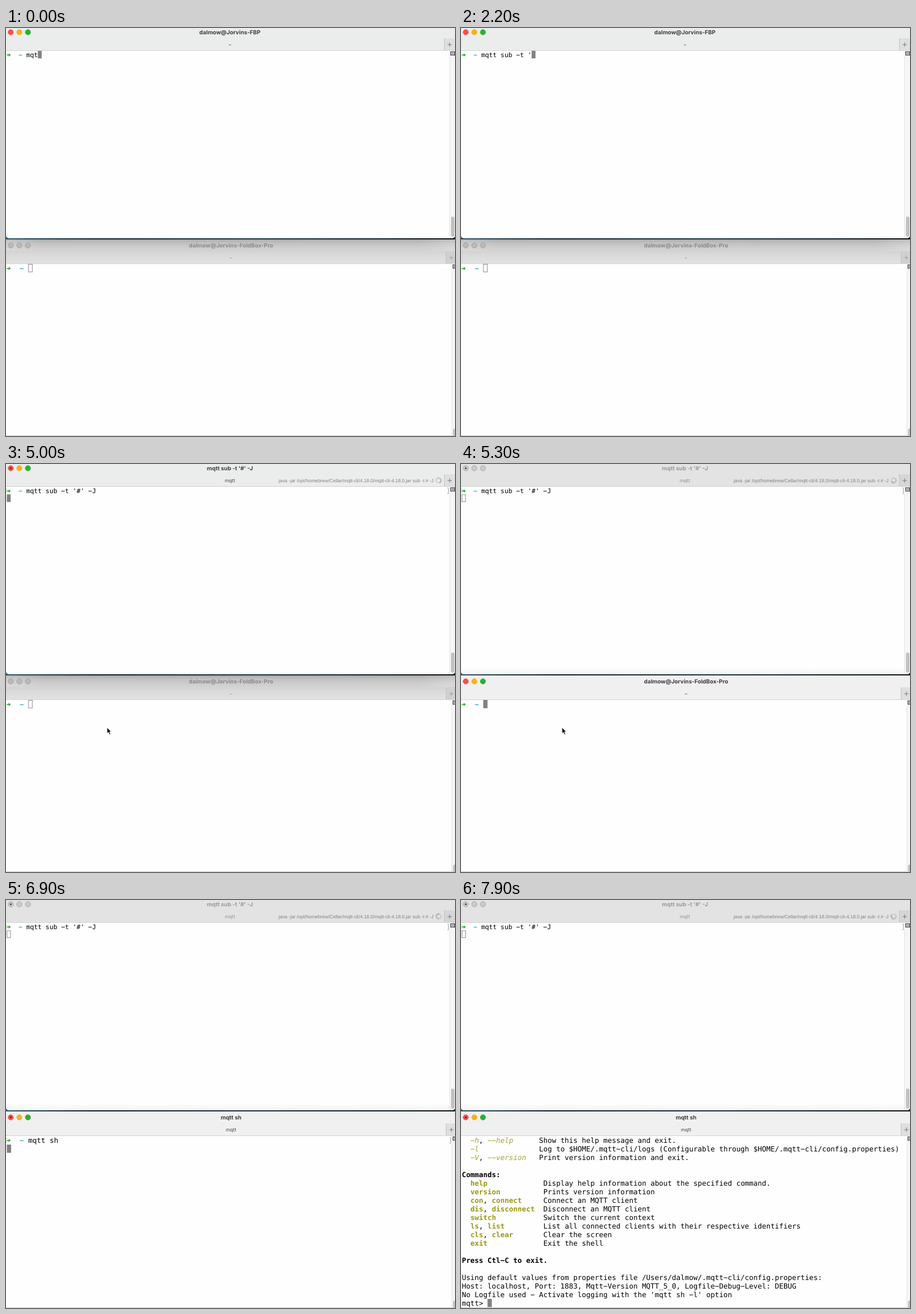
Write an HTML page that moves like this. It is 784 px wide and 714 px high and loops after 8 s.

```html
<!DOCTYPE html>
<html lang="en">
<head>
<meta charset="utf-8">
<title>Two terminals</title>
<style>
  html, body { margin: 0; width: 100%; height: 100%; overflow: hidden; background: #fff; }
  svg { display: block; width: 784px; height: 714px; }
  text { white-space: pre; text-rendering: geometricPrecision; }
  .mono { font-family: "DejaVu Sans Mono", monospace; }
  .ui { font-family: Inter, sans-serif; text-anchor: middle; }
  .job { font: 8.3px "Liberation Sans", sans-serif; fill: #808080; }
</style>
</head>
<body>
<svg id="stage" viewBox="0 0 784 714" xmlns="http://www.w3.org/2000/svg"></svg>
<script>
const LOOP = 8000, STEP = 100;
const FOCUS = 5300, RUN_TOP = 3800, JOB = 4000, RUN_BOTTOM = 6700, OUTPUT = 7300;
const USER = 'dalmow';

// Geometry of the two windows; size is the font size, row the line pitch.
const upper = { y: 0, mid: 391, edge: 774, tab: 765, size: 11.25, row: 13.2, base: 51, cell: 40, cellH: 13.2,
  bar: '#ebecec', host: USER + '@Jorvins-FBP' };
const lower = { y: 373, mid: 393, edge: 778, tab: 768, size: 12.44, row: 15, base: 424.6, cell: 413, cellH: 14.4,
  bar: '#f0f0f0', host: USER + '@Jorvins-FoldBox-Pro' };

// Each key appears at its own time.
const upperKeys = { text: "mqtt sub -t '#' -J",
  times: [0, 0, 0, 100, 300, 700, 900, 1000, 1200, 1600, 1800, 2000, 2200, 2500, 2700, 2800, 3200, 3300] };
const lowerKeys = { text: 'mqtt sh', times: [5900, 6000, 6100, 6200, 6300, 6400, 6500] };

const options = [
  ['-h, --help', 'Show this help message and exit.'],
  ['-l', 'Log to $HOME/.mqtt-cli/logs (Configurable through $HOME/.mqtt-cli/config.properties)'],
  ['-V, --version', 'Print version information and exit.']
];
const commands = [
  ['help', 'Display help information about the specified command.'],
  ['version', 'Prints version information'],
  ['con, connect', 'Connect an MQTT client'],
  ['dis, disconnect', 'Disconnect an MQTT client'],
  ['switch', 'Switch the current context'],
  ['ls, list', 'List all connected clients with their respective identifiers'],
  ['cls, clear', 'Clear the screen'],
  ['exit', 'Exit the shell']
];
const footer = [
  `Using default values from properties file /Users/${USER}/.mqtt-cli/config.properties:`,
  'Host: localhost, Port: 1883, Mqtt-Version MQTT_5_0, Logfile-Debug-Level: DEBUG',
  "No Logfile used - Activate logging with the 'mqtt sh -l' option",
  'mqtt>'
];

const BOLD = 'font-weight="700"';
const rect = (x, y, w, h, fill, more = '') =>
  `<rect x="${x}" y="${y}" width="${w}" height="${h}" fill="${fill}" ${more}/>`;
const path = (d, stroke, width = 1, fill = 'none') =>
  `<path d="${d}" stroke="${stroke}" stroke-width="${width}" fill="${fill}"/>`;
const colX = (win, col) => 1.4 + col * win.size * 0.602;
const typed = (keys, t) => keys.text.slice(0, keys.times.filter(k => k <= t).length);

// Terminal hyphens are drawn as wide as a minus sign.
function mono(win, col, row, str, more = '') {
  return `<text class="mono" x="${colX(win, col)}" y="${win.base + row * win.row}" font-size="${win.size}" ${more}>` +
    str.replace(/-/g, '\u2212') + '</text>';
}

function caret(win, col, row, active) {
  const x = colX(win, col), y = win.cell + row * win.row, w = win.size * 0.602;
  return active ? rect(x, y, w, win.cellH, '#828282')
    : rect(x + .3, y + .5, w - .6, win.cellH - 1, 'none', 'stroke="#8a8a8a"');
}

function prompt(win, command) {
  const y = win.base - 3.8;
  return path(`M1.5 ${y}H5`, '#22ad22', 1.7) +
    path(`M4.4 ${y - 3}L8.4 ${y}L4.4 ${y + 3}L5.2 ${y}Z`, 'none', 0, '#22ad22') +
    mono(win, 3, 0, '~', BOLD + ' fill="#35a9b9"') + mono(win, 5, 0, command);
}

function lights(win, active, running) {
  const dim = win === lower ? '#b9b9b9' : '#cbcbcb';
  return ['#f0524b', '#f5b11f', '#2bb034'].map((color, i) =>
    `<circle cx="${8.3 + i * 15}" cy="${win.y + 7.4}" r="4.6" fill="${active ? color : dim}"
      stroke="${active ? color : '#a0a0a0'}" stroke-width=".9"/>`).join('') +
    (running ? `<circle cx="8.3" cy="${win.y + 7.4}" r="1.6" fill="${active ? '#7c1712' : '#4a4a4a'}"/>` : '');
}

function chrome(win, active, title, tabTitle, running) {
  const { y, mid, tab } = win;
  const shaded = win === lower && !active;
  const bar = active ? win.bar : shaded ? 'url(#shade)' : '#e3e3e3';
  const top = win === lower ? 370 : 0;
  const plus = tab + 9.7, py = y + 29;
  return rect(0, top, 784, y + 39 - top, bar) +
    (shaded ? rect(0, top, 784, 20, 'url(#sides)') : '') +
    rect(tab, y + 18, 20, 21, shaded ? '#d0d0d0' : active ? '#dfdfe0' : '#d6d6d6') +
    path(`M${tab + .5} ${y + 18}V${y + 39}`, '#c2c2c2') +
    path(`M0 ${y + 39.5}H784`, '#d4d4d4') +
    path(`M${plus - 3.7} ${py}h7.4M${plus} ${py - 3.7}v7.4`, shaded ? '#9b9b9b' : '#6c6c6c', .9) +
    lights(win, active, running) +
    `<text class="ui" x="${mid}" y="${y + 10.5}" font-size="9.8" ${BOLD}
      fill="${active ? '#3e3e3e' : shaded ? '#8b8b8b' : '#9a9a9a'}">${title}</text>` +
    `<text class="ui" x="${mid}" y="${y + 31.8}" font-size="8.4"
      fill="${active ? '#454545' : '#929292'}">${tabTitle}</text>`;
}

function scrollbar(win, bottom, thumbX, thumbY, thumbH) {
  const { edge, y } = win, top = y + 40, x = edge + 2.5;
  return rect(edge, top, 784 - edge, bottom - top, '#f6f6f6') +
    path(`M${edge + .5} ${top}V${bottom}`, '#e5e5e5') +
    rect(thumbX, thumbY, 6, thumbH, '#c1c1c1', 'rx="3"') +
    rect(x, top + 1.5, 7, 6, '#fff', 'stroke="#2c2c2c"') +
    path(`M${x + 1} ${top + 3.5}h5M${x + 1} ${top + 5.5}h5`, '#444', .9);
}

function marks(win) {
  const x = win.edge - 1.5, y = win.base - 9;
  return path(`M${x - 2} ${y}h2v10h-2`, '#9a9a9a', .9) + path(`M1.4 ${y + 1}h-1v8h1`, '#b5b5b5', .7);
}

function spinner(t) {
  let out = '';
  for (let i = 0; i < 12; i++) {
    const a = i * Math.PI / 6, c = Math.cos(a), s = Math.sin(a);
    const age = (Math.floor(t / STEP) - i + 1200) % 12;
    out += `<path d="M${755.5 + 2.8 * c} ${28.7 + 2.8 * s}L${755.5 + 5.8 * c} ${28.7 + 5.8 * s}"
      stroke="#555" stroke-width=".9" opacity="${.85 - age * .055}"/>`;
  }
  return out;
}

function flags(row, names, style, color) {
  let col = 2;
  return names.split(', ').map((name, i) => {
    const comma = i ? mono(lower, col - 2, row, ',') : '';
    const part = mono(lower, col, row, name, `${style} fill="${color}"`);
    col += name.length + 2;
    return comma + part;
  }).join('');
}

function help() {
  return options.map(([names, about], i) =>
      flags(i, names, 'font-style="italic"', '#a3a232') + mono(lower, 18, i, about)).join('') +
    mono(lower, 0, 4, 'Commands:', BOLD) +
    commands.map(([names, about], i) =>
      flags(i + 5, names, BOLD, '#999817') + mono(lower, 19, i + 5, about)).join('') +
    mono(lower, 0, 14, 'Press Ctl-C to exit.', BOLD) +
    footer.map((line, i) => mono(lower, 0, i + 16, line)).join('') +
    caret(lower, 6, 19, true);
}

function pointer(t) {
  if (t < 4500 || t >= 5900) return '';
  if (t >= FOCUS + STEP) {
    return path('M175.7 462q2 0 2.3 1.5q.3-1.5 2.3-1.5M178 463v9M175.7 473q2 0 2.3-1.5q.3 1.5 2.3 1.5M176.7 468h2.6', '#222', 1);
  }
  const left = Math.max(0, 1 - (t - 4500) / 400) ** 2;
  return `<g transform="translate(${176.3 + 50 * left} ${461 + 9 * left})">` +
    path('M0 0V10.8L2.5 8.6L4.2 12.6L6.2 11.8L4.5 7.8H7.8Z', '#fff', .8, '#151515') + '</g>';
}

const defs = `<defs>
  <linearGradient id="shade" x1="0" y1="0" x2="0" y2="1">
    <stop offset="0" stop-color="#a9a9a9"/><stop offset=".12" stop-color="#bebebe"/>
    <stop offset=".3" stop-color="#cbcbcb"/><stop offset=".65" stop-color="#dadada"/>
    <stop offset="1" stop-color="#e1e1e1"/>
  </linearGradient>
  <linearGradient id="sides">
    <stop offset="0" stop-color="#fff" stop-opacity=".2"/><stop offset=".08" stop-color="#fff" stop-opacity="0"/>
    <stop offset=".92" stop-color="#fff" stop-opacity="0"/><stop offset="1" stop-color="#fff" stop-opacity=".2"/>
  </linearGradient>
  <linearGradient id="gap">
    <stop offset="0" stop-color="#2c536c"/><stop offset=".2" stop-color="#101d26"/>
    <stop offset=".55" stop-color="#1c333f"/><stop offset="1" stop-color="#0b1014"/>
  </linearGradient>
  <linearGradient id="lift" x1="0" y1="0" x2="0" y2="1">
    <stop offset="0" stop-color="#fff"/><stop offset="1" stop-color="#f4f6f2"/>
  </linearGradient>
  <clipPath id="frame"><rect y="-20" width="784" height="388" rx="5"/></clipPath>
</defs>`;

function drawUpper(t) {
  const active = t < FOCUS, running = t >= RUN_TOP;
  const command = typed(upperKeys, t);
  return '<g clip-path="url(#frame)">' + rect(0, 0, 784, 368, '#fefefe') +
    (active ? '' : rect(0, 353, 784, 15, 'url(#lift)')) +
    scrollbar(upper, 368, 777, 330, 35) +
    chrome(upper, active, running ? command : upper.host, running ? 'mqtt' : '~', running) +
    (t >= JOB ? '<text class="job" x="476" y="32">java -jar /opt/homebrew/Cellar/mqtt-cli/4.18.0/mqtt-cli-4.18.0.jar sub -t # -J</text>' + spinner(t) : '') +
    prompt(upper, command) + (running ? marks(upper) : '') +
    caret(upper, running ? 0 : 5 + command.length, running ? 1 : 0, active) + '</g>';
}

function drawLower(t) {
  const active = t >= FOCUS, running = t >= RUN_BOTTOM;
  const command = typed(lowerKeys, t);
  const shell = prompt(lower, command) + (running ? marks(lower) : '') +
    caret(lower, running ? 0 : 5 + command.length, running ? 1 : 0, active);
  return rect(0, 370, 784, 344, '#fefefe') +
    scrollbar(lower, 714, 780.5, 701, 20) +
    chrome(lower, active, running ? command : lower.host, running ? 'mqtt' : '~', running) +
    (t >= OUTPUT ? help() : shell) +
    path('M0 713.5H780', '#c9c9c9');
}

const stage = document.getElementById('stage');
let shown = -1;

function draw(now) {
  const t = Math.floor(now % LOOP / STEP) * STEP;
  if (t !== shown) {
    shown = t;
    stage.innerHTML = defs + rect(0, 360, 784, 10, 'url(#gap)') + drawUpper(t) + drawLower(t) + pointer(t);
  }
}

const start = performance.now();
function tick() {
  draw(performance.now() - start);
  requestAnimationFrame(tick);
}
tick();
</script>
</body>
</html>
```
